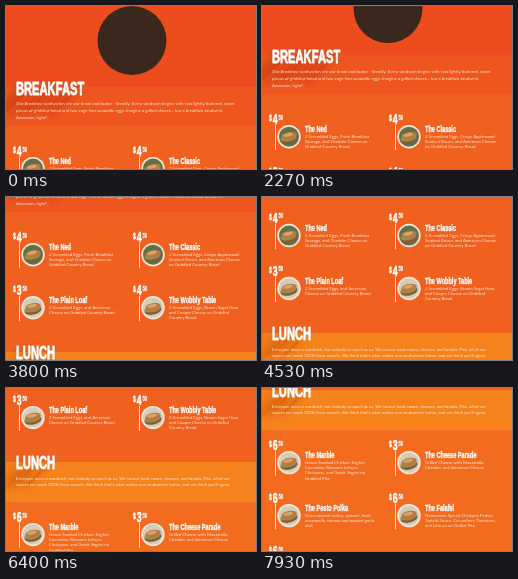
Recreate the animation shown at these times as an HTML page with a canvas. Size 250 by 163 pixels, loop 8 s.

```html
<!DOCTYPE html>
<html lang="en">
<head>
<meta charset="utf-8">
<title>Sandwich menu</title>
<style>
  html, body { margin: 0; width: 100%; height: 100%; overflow: hidden; background: #ee511e; }
  canvas { display: block; width: 100vw; height: 100vh; }
</style>
</head>
<body>
<canvas id="stage"></canvas>
<script>
const W = 250, H = 163, LOOP = 8000, STEP = LOOP / 120;
const CONDENSE = 0.62; // narrow display face
const DISPLAY = '"Liberation Sans", Arial, sans-serif';
const BODY = 'Lato, "Open Sans", sans-serif';

const canvas = document.getElementById('stage');
const ctx = canvas.getContext('2d');
const ratio = window.devicePixelRatio || 1;
canvas.width = W * ratio;
canvas.height = H * ratio;

// Time in ms and scroll offset in px
const stops = [[0, 0], [2270, 32], [3130, 82.4], [4530, 126], [6400, 186], [7330, 248], [8000, 258.5]];

const bands = [
  [0, 81, '#ed4d1e'],
  [81, 120, '#ee561e'],
  [120, 260, '#f0601e'],
  [260, 300, '#f6821c'],
  [300, 460, '#f26b1f']
];

const sections = [
  { title: 'BREAKFAST', y: 88.5, text: [
    'Our Breakfast sandwiches are our bread and butter - literally. Every sandwich begins with two lightly buttered, warm',
    'pieces of griddled bread and two cage-free scramble eggs. Imagine a grilled cheese... but a breakfast sandwich.',
    'Awesome, right?'] },
  { title: 'LUNCH', y: 267, text: [
    'Everyone loves a sandwich, but nobody as much as us. We source local meats, cheeses, and breads. Plus, all of our',
    "sauces are made 100% from scratch. We think that's what makes our sandwiches better, and we think you'll agree."] }
];

const rows = [155, 208, 325, 378, 431];
const items = [
  { name: 'The Ned', price: 4, text: ['2 Scrambled Eggs, Fresh Breakfast', 'Sausage, and Cheddar Cheese on', 'Griddled Country Bread'] },
  { name: 'The Classic', price: 4, text: ['2 Scrambled Eggs, Crispy Applewood', 'Smoked Bacon, and American Cheese', 'on Griddled Country Bread'] },
  { name: 'The Plain Loaf', price: 3, text: ['2 Scrambled Eggs, and American', 'Cheese on Griddled Country Bread'] },
  { name: 'The Wobbly Table', price: 4, text: ['2 Scrambled Eggs, Brown Sugar Ham,', 'and Cooper Cheese on Griddled', 'Country Bread'] },
  { name: 'The Marble', price: 6, text: ['House Smoked Chicken, English', 'Cucumber, Romaine Lettuce,', 'Chickpeas, and Greek Yogurt on', 'Griddled Pita'] },
  { name: 'The Cheese Parade', price: 3, text: ['Grilled Cheese with Mozzarella,', 'Cheddar, and American Cheese'] },
  { name: 'The Pesto Polka', price: 6, text: ['Oven roasted turkey, spinach, basil,', 'mozzarella, tomato and roasted garlic', 'aioli'] },
  { name: 'The Falafel', price: 6, text: ['Homemade Spiced Chickpea Patties,', 'Tzatziki Sauce, Cucumbers, Tomatoes,', 'and Lettuce on Grilled Pita'] },
  { name: '', price: 6, text: [] }
];

// Monotone cubic through the stops
function scrollAt(t) {
  const slope = i => (stops[i + 1][1] - stops[i][1]) / (stops[i + 1][0] - stops[i][0]);
  const last = stops.length - 1;
  const tangent = i => {
    if (i === 0 || i === last) return 0;
    const a = slope(i - 1), b = slope(i);
    return 2 * a * b / (a + b);
  };
  let i = 0;
  while (i < last - 1 && t >= stops[i + 1][0]) i++;
  const [t0, y0] = stops[i], [t1, y1] = stops[i + 1];
  const d = t1 - t0, u = (t - t0) / d, v = 1 - u;
  return y0 * (1 + 2 * u) * v * v + tangent(i) * d * u * v * v
       + y1 * u * u * (3 - 2 * u) - tangent(i + 1) * d * u * u * v;
}

function display(text, x, y, size, color = '#fff', weight = 0.05) {
  ctx.save();
  ctx.translate(x, y);
  ctx.scale(CONDENSE, 1);
  ctx.font = `bold ${size}px ${DISPLAY}`;
  ctx.fillStyle = ctx.strokeStyle = color;
  ctx.lineJoin = 'round';
  ctx.lineWidth = size * weight;
  ctx.fillText(text, 0, 0);
  if (weight) ctx.strokeText(text, 0, 0);
  ctx.restore();
}

function lines(list, x, y, size, gap) {
  ctx.font = `${size}px ${BODY}`;
  ctx.fillStyle = 'rgba(255,246,238,.9)';
  list.forEach((line, i) => ctx.fillText(line, x, y + i * gap));
}

function oval(x, y, rx, ry, color, turn = 0) {
  ctx.beginPath();
  ctx.ellipse(x, y, rx, ry, turn, 0, Math.PI * 2);
  ctx.fillStyle = color;
  ctx.fill();
}

function plate(x, y, dish) {
  oval(x, y, 11.7, 11.7, '#f1e8da');
  oval(x, y, 10, 10, dish);
  oval(x, y + 2.6, 8.6, 4.4, '#8a5a30', -0.2);
  oval(x - 0.5, y + 1.4, 8.2, 3.2, '#8f9450', -0.2);
  oval(x, y - 0.8, 7.8, 3.8, '#b97a42', -0.2);
  oval(x - 1, y - 1.8, 4.8, 1.7, '#d9a468', -0.2);
}

function drawItem(item, i) {
  const row = Math.floor(i / 2), x = i % 2 * 120, y = rows[row];
  display('$', x + 7, y - 8, 8.5);
  display(item.price, x + 10.8, y - 5, 14);
  display('50', x + 16.5, y - 9.5, 6.5);
  ctx.fillStyle = 'rgba(255,255,255,.8)';
  ctx.fillRect(x + 13, y - 4, 1, 25);
  plate(x + 27, y + 7.6, row ? '#d5cbb9' : '#62704a');
  display(item.name, x + 43, y + 2.8, 9);
  lines(item.text, x + 43, y + 8.6, 4.3, 5.4);
}

function longShadow(text, x, y, size) {
  for (let i = 1; i <= 24; i++) {
    display(text, x - i, y + i, size, 'rgba(150,35,0,.03)', 0);
  }
}

function drawSection({ title, y, text }) {
  longShadow(title, 10, y, 18);
  display(title, 10, y, 18);
  lines(text, 10, y + 10.8, 4.3, 6.6);
}

function draw(t) {
  ctx.setTransform(ratio, 0, 0, ratio, 0, 0);
  ctx.translate(0, -scrollAt(t));
  bands.forEach(([top, bottom, color]) => {
    ctx.fillStyle = color;
    ctx.fillRect(0, top, W, bottom - top + 0.5);
  });
  oval(126, 34.5, 34.5, 34.5, '#3b281d');
  sections.forEach(drawSection);
  items.forEach(drawItem);
}

function tick() {
  const t = performance.now() % LOOP;
  draw(Math.floor(t / STEP + 0.01) * STEP);
  requestAnimationFrame(tick);
}
tick();
</script>
</body>
</html>
```
